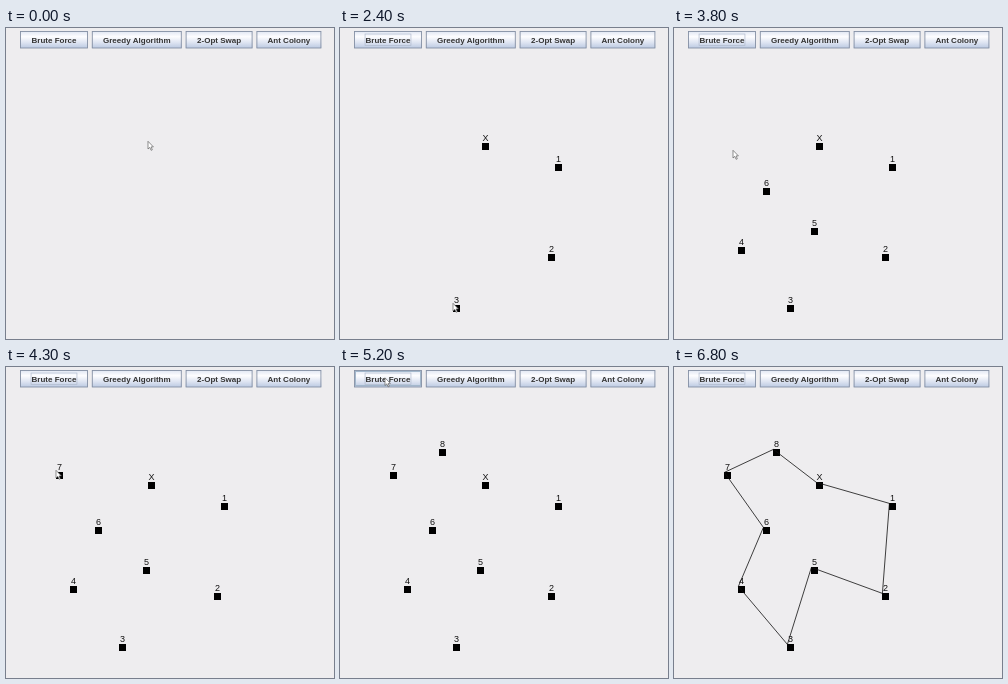
An HTML page with a canvas that plays this animation: 328 by 311 pixels, repeating every 7.2 s.

```html
<!DOCTYPE html>
<html>
<head>
<meta charset="utf-8">
<title>Tour solver</title>
<style>
html, body { margin: 0; width: 328px; height: 311px; overflow: hidden; background: #eeedef; }
canvas { display: block; }
</style>
</head>
<body>
<canvas id="stage" width="328" height="311"></canvas>
<script>
const ctx = document.getElementById('stage').getContext('2d');
const LOOP = 7200, TICK = 100, LEAD = 300;
const PRESS = 5500, SOLVED = 5600, LEAVE = 6600, GONE = 6800;
const FONT = '"Liberation Sans", Arial, sans-serif';
const buttons = ['Brute Force', 'Greedy Algorithm', '2-Opt Swap', 'Ant Colony'];
const order = 'X12534678';

// Pointer stops: arrival time, x, y; a labelled stop is a click that adds a city.
const stops = [
  [500, 142, 113, 'X'], [600, 212, 133], [900, 215, 134, '1'], [1200, 223, 179],
  [2300, 208, 224, '2'], [2400, 113, 275, '3'], [2800, 64, 218], [3000, 64, 217, '4'],
  [3100, 126, 200], [3300, 137, 198, '5'], [3700, 89, 158, '6'], [3800, 59, 122],
  [4100, 50, 103, '7'], [4600, 99, 80, '8'], [4800, 59, 22.5], [5100, 45, 10.5],
  [GONE, 230, 160]
];
const cities = stops.filter(s => s[3])
  .map(([since, x, y, label]) => ({ since, x, y: y + 2, label }));

function pointerAt(t) {
  let [last, x, y] = stops[0];
  for (const [time, toX, toY] of stops) {
    const start = Math.max(last, time - LEAD);
    const k = time > start ? Math.min(1, Math.max(0, (t - start) / (time - start))) : 0;
    x += (toX - x) * k;
    y += (toY - y) * k;
    last = time;
  }
  return [x, y];
}

function text(label, x, y, color) {
  ctx.fillStyle = color;
  ctx.textAlign = 'center';
  ctx.fillText(label, x, y);
}

function outline(x, y, w, h, color, width) {
  ctx.strokeStyle = color;
  ctx.lineWidth = width;
  ctx.strokeRect(x, y, w, h);
}

function drawButtons(t) {
  const shade = ctx.createLinearGradient(0, 3, 0, 20);
  ['#dfe5f2', '#fdfdff', '#dfe5f2', '#bccae2'].forEach((c, i) =>
    shade.addColorStop(i / 3, c));
  ctx.font = 'bold 8px ' + FONT;
  let x = 14;
  buttons.forEach((label, i) => {
    const textW = ctx.measureText(label).width, w = Math.round(textW + 22.7);
    const first = i === 0, mid = x + w / 2;
    ctx.fillStyle = first && t >= PRESS && t < SOLVED ? '#b8cfe5' : shade;
    ctx.fillRect(x, 3, w, 17);
    if (first && t >= 4900 && t < LEAVE) outline(x + 1.5, 4.5, w - 3, 14, '#a3b8cc', 1);
    outline(x + 0.5, 3.5, w - 1, 16.5, '#8590a4', 0.9);
    if (first && t >= 500) outline(mid - textW / 2 - 0.5, 6, textW + 1, 11.5, '#b0bace', 0.7);
    text(label, mid, 15, '#333');
    x += w + 3.8;
  });
}

function drawCities(t) {
  ctx.font = '9px ' + FONT;
  for (const { since, x, y, label } of cities) {
    if (t < since) continue;
    ctx.fillStyle = '#000';
    ctx.fillRect(x, y, 7, 7);
    text(label, x + 3.6, y - 2, '#111');
  }
}

function drawTour() {
  ctx.beginPath();
  for (const label of order) {
    const { x, y } = cities.find(c => c.label === label);
    ctx.lineTo(x + 0.4, y + 0.4);
  }
  ctx.closePath();
  ctx.lineWidth = 0.8;
  ctx.strokeStyle = '#111';
  ctx.stroke();
}

const arrow = new Path2D('M.3 .3V8L2.1 6.4 3.4 9.3 4.6 8.8 3.4 5.9H5.7Z');
function drawPointer(x, y) {
  ctx.save();
  ctx.translate(x - 0.3, y);
  ctx.fillStyle = '#fff';
  ctx.strokeStyle = '#555';
  ctx.lineWidth = 0.65;
  ctx.fill(arrow);
  ctx.stroke(arrow);
  ctx.restore();
}

function draw(t) {
  ctx.fillStyle = '#eeedef';
  ctx.fillRect(0, 0, 328, 311);
  drawButtons(t);
  drawCities(t);
  if (t >= SOLVED) drawTour();
  if (t < GONE) drawPointer(...pointerAt(t));
}

function frame() {
  const t = performance.now() % LOOP;
  draw(Math.floor(t / TICK) * TICK);
  requestAnimationFrame(frame);
}
frame();
</script>
</body>
</html>
```
